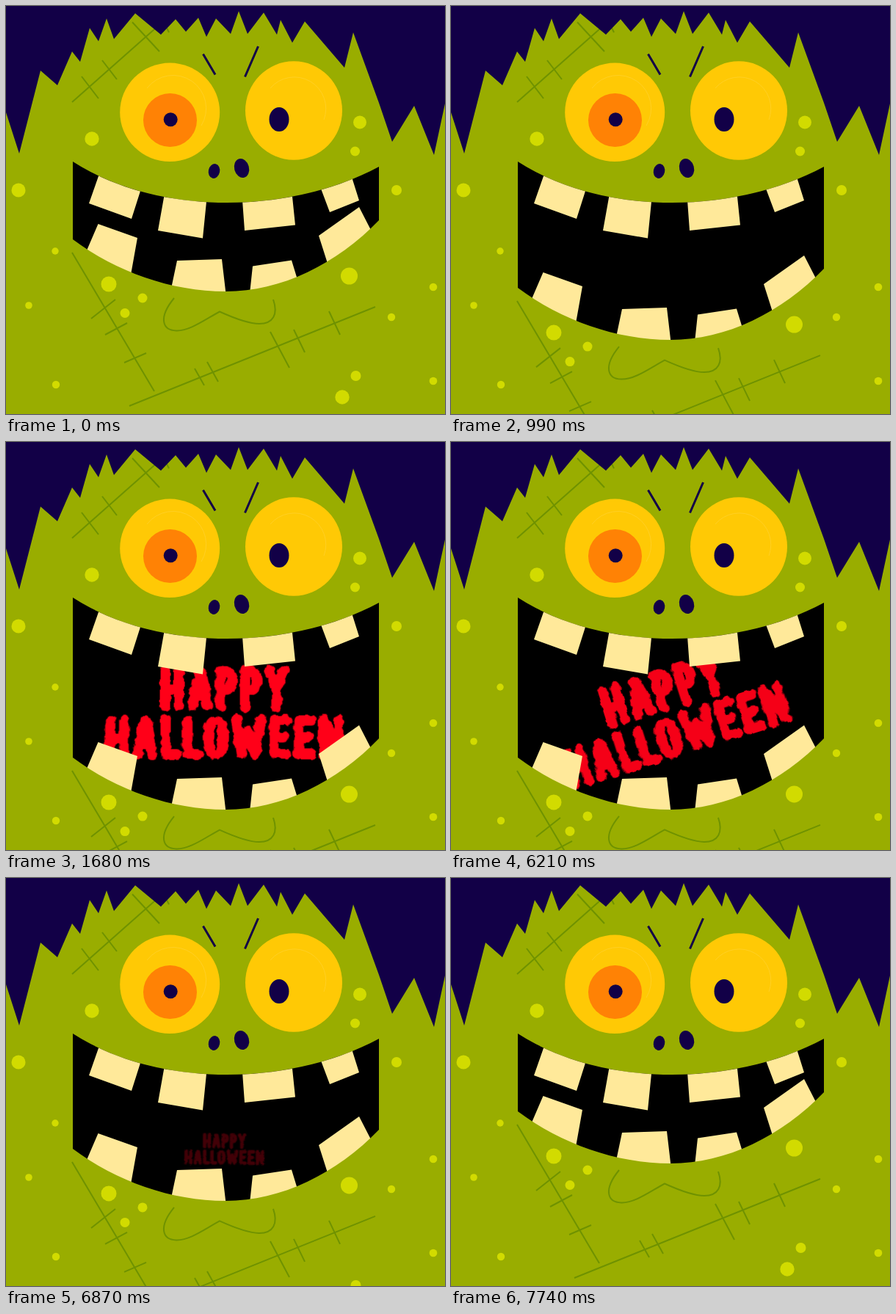
Recreate the animation shown at these times as an HTML page. Size 598x556 px, loop 9600 ms.

```html
<!DOCTYPE html>
<html lang="en">
<head>
<meta charset="utf-8">
<title>Happy Halloween</title>
<style>
html, body { margin: 0; width: 100%; height: 100%; overflow: hidden; background: #99ad00; }
svg { display: block; width: 100vw; height: 100vh; }
.scar { fill: none; stroke: #6f9200; stroke-width: 2; }
.spots { fill: #d2db00; }
.hair { fill: #120047; }
.teeth { fill: #ffe99a; }
.brow { stroke: #120047; stroke-width: 3; }
.ring { fill: none; stroke: #ffd024; stroke-width: 1; }
#words { fill: none; stroke: #ff0018; stroke-width: 14; stroke-linecap: round; stroke-linejoin: round; }
</style>
</head>
<body>
<svg viewBox="0 0 598 556">
  <defs>
    <path id="mouth" d="M91 212C205 286 385 285 508 219V560H91Z"/>
    <clipPath id="inMouth"><use href="#mouth"/></clipPath>
    <filter id="ragged" x="-10%" y="-10%" width="120%" height="120%" color-interpolation-filters="sRGB">
      <feTurbulence type="fractalNoise" baseFrequency=".09" numOctaves="2" seed="4"/>
      <feDisplacementMap in="SourceGraphic" scale="8" xChannelSelector="R" yChannelSelector="G"/>
    </filter>
  </defs>

  <rect width="598" height="556" fill="#99ad00"/>
  <path class="scar" d="M90 131L204 30M172 22L209 62M131 74L151 100M103 96L126 126M218 28L222 36"/>
  <path class="hair" d="M0 0H598V133L583 203L556 136L526 185L508 132L473 36L461 84L407 21L390 50L374 19L369 39L351 9L329 38L317 7L306 38L286 17L273 42L262 16L245 35L231 18L211 39L176 10L147 45L137 17L126 48L114 30L101 76L90 62L70 108L47 88L18 201L0 145Z"/>
  <g class="spots" id="faceSpots"></g>

  <g fill="#ffc905">
    <ellipse cx="223.2" cy="144.8" rx="68" ry="67.2"/>
    <ellipse cx="392" cy="142.5" rx="66" ry="67.2"/>
  </g>
  <path class="ring" d="M192 112A45 45 0 0 1 266 163M360 112A43 43 0 0 1 433 155"/>
  <circle cx="223.5" cy="155.5" r="36.5" fill="#ff8205"/>
  <g class="hair">
    <circle cx="224.2" cy="154.8" r="9.5"/>
    <ellipse cx="372" cy="154.5" rx="13.5" ry="16.5"/>
    <ellipse cx="283.5" cy="225" rx="7.7" ry="10" transform="rotate(12 283.5 225)"/>
    <ellipse cx="321" cy="221" rx="10" ry="13.2" transform="rotate(-15 321 221)"/>
  </g>
  <path class="brow" d="M268.5 65.5L285 93.5M343.5 55L325.500 96.500"/>

  <use href="#mouth"/>
  <g clip-path="url(#inMouth)">
    <g id="words" role="img" aria-label="HAPPY HALLOWEEN"><g id="letters" filter="url(#ragged)"></g></g>
  </g>

  <g id="jaw">
    <path class="teeth" d="M125.500 297L179 316L169 372L107 340ZM233 347L294 345L299.500 392L223.500 392ZM336 354.500L389 346.500L398 376L332 392ZM426 313L481 274L500 311L440 357Z"/>
    <path fill="#99ad00" d="M508 292C450 352 375 389 299 389C225 389 150 362 91 318V560H508Z"/>
    <path class="scar" d="M90 336L202 525M116 426L149 400M135 448L165 432M161 486L191 473M168 545L503 410M257 494L270 517M274 485L289 512M360 444L386 493M392 441L407 472M440 416L455 448"/>
    <path class="scar" d="M229 398C207 425 213 442 232 442.500C250 443 270 428 291 416.500C312 426 330 433 345 433C364 433 371 420 364 400"/>
    <g class="spots" id="jawSpots"></g>
  </g>

  <path class="teeth" clip-path="url(#inMouth)" d="M127 229L185 246L171 290L113 269ZM217 250L274 257L268 316.500L207 306ZM321.500 258L389 250L394 298.500L325 306ZM426 241L470 230L481 265L441 281Z"/>
</svg>

<script>
const $ = id => document.getElementById(id);

function add(parent, tag, attrs) {
  const el = document.createElementNS('http://www.w3.org/2000/svg', tag);
  for (const key in attrs) el.setAttribute(key, attrs[key]);
  parent.append(el);
}

const addSpots = (id, spots) =>
  spots.forEach(([cx, cy, r]) => add($(id), 'circle', { cx, cy, r }));

addSpots('faceSpots', [[117, 181, 9.7], [17, 251, 9.5], [67, 334, 4.7], [31, 408, 4.8],
  [68, 516, 5.2], [482, 158.5, 9], [475.5, 198, 6.5], [532, 251, 7], [582, 383, 5.3],
  [525, 424, 5.2], [582, 511, 5.3]]);
addSpots('jawSpots', [[140, 379, 10.5], [186, 398, 6.5], [162, 418.5, 6.5],
  [467.5, 368, 11.5], [476.5, 504, 7], [458, 533, 9.7]]);

// Drippy hand lettering: advance width and centre lines of each letter
const glyphs = {
  H: [38, 'M9 7V55M28 7V55M9 33H28'],
  A: [36, 'M8 55L16 9H20L28 55M12 40H24'],
  P: [33, 'M9 7V56M9 9H16Q25 9 25 21T16 33H9'],
  Y: [37, 'M8 7L18 30L29 7M18 28V56'],
  L: [29, 'M9 7V54H24'],
  O: [37, 'M18 9Q28 9 28 31T18 54Q8 54 8 31T18 9'],
  W: [50, 'M8 7L15 54L24 22L34 54L42 7'],
  E: [33, 'M26 8H9V54H26M9 31H22'],
  N: [38, 'M9 56V7L29 55V7']
};

function write(word, x, y) {
  for (const ch of word) {
    const [width, d] = glyphs[ch];
    add($('letters'), 'path', { d, transform: `translate(${x} ${y})` });
    x += width + .7;
  }
}
write('HAPPY', -90, -65);
write('HALLOWEEN', -164.5, 2);

const LOOP = 9600, STEP = 30, OPEN_END = 1680;
const part = (t, start, length) => Math.min(1, Math.max(0, (t - start) / length));
const inOut = x => (1 - Math.cos(Math.PI * x)) / 2;
const out = x => Math.sin(x * Math.PI / 2);

function draw(t) {
  const opened = Math.min(t, OPEN_END);
  const drop = 112.5 * (inOut(part(opened, 38, 1712)) - 0)
    * (1 - inOut(part(t, 6200, 1540) ** .765));
  const enter = out(part(t, 1140, 540));
  const leave = out(part(t, 6180, 1302));
  const shown = enter * (1 - leave);
  const size = (.1 + .9 * enter) * (1 - .9 * leave);
  const angle = -180 * (1 - enter) - 486 * leave;

  $('jaw').setAttribute('transform', `translate(0 ${drop})`);
  $('words').setAttribute('transform', `translate(297.5 369.5) rotate(${angle}) scale(${size})`);
  $('words').setAttribute('opacity', shown);
}

const begin = performance.now();
function tick() {
  const t = (performance.now() - begin) % LOOP;
  draw(Math.floor(t / STEP) * STEP);
  requestAnimationFrame(tick);
}
tick();
</script>
</body>
</html>
```
